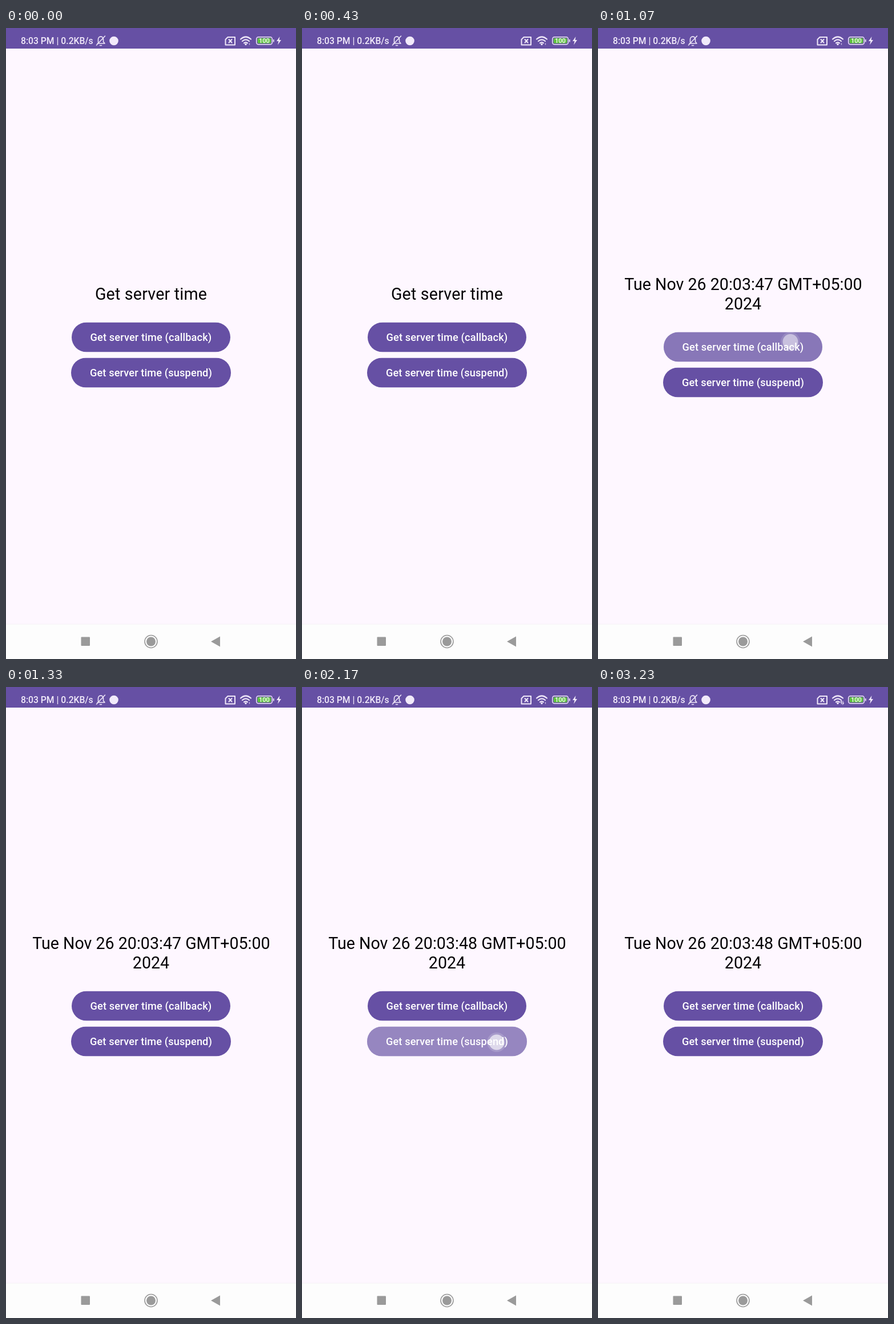
An HTML page for the animation above (3310 ms loop, 508x1103 px).

```html
<!DOCTYPE html>
<html lang="en">
<head>
<meta charset="utf-8">
<title>Get server time</title>
<style>
  html, body { margin: 0; width: 100%; height: 100%; overflow: hidden; background: #fef7ff; }
  svg { display: block; width: 100%; height: 100%; }
  text { font-family: Roboto, sans-serif; }
  .status { font-size: 15.7px; font-weight: 500; fill: #f1eafa; }
  .title { font-size: 28.6px; text-anchor: middle; fill: #050306; }
  .label { font-size: 18.2px; font-weight: 500; letter-spacing: .13px; text-anchor: middle; fill: #fff; }
  .icon { fill: none; stroke: #eee6f8; stroke-width: 2; stroke-linejoin: round; stroke-linecap: round; }
</style>
</head>
<body>
<svg viewBox="0 0 508 1103">
  <defs>
    <clipPath id="clip0"><rect x="115" y="514.5" width="278" height="52" rx="26"/></clipPath>
    <clipPath id="clip1"><rect x="114" y="576.5" width="280" height="52" rx="26"/></clipPath>
  </defs>
  <rect width="508" height="1103" fill="#fef7ff"/>

  <!-- status bar -->
  <rect width="508" height="36" fill="#6650a4"/>
  <text class="status" x="26" y="28">8:03 PM | 0.2KB/s</text>
  <g class="icon" stroke-width="1.6">
    <path d="M160 27H173L170.500 24V20C170.500 13.500 161.500 13.500 161.500 20V25M164.500 30.500H167.500M158.500 30L173.500 14" style="stroke-width:1.600px"/>
    <path d="M388.500 16H401V29.500H384.500V20ZM390.500 20L395.500 25.500M395.500 20L390.500 25.500"/>
    <path d="M411 19.500Q420 11.500 429 19.500M414 23Q420 17.700 426 23M417 26.300Q420 23.800 423 26.300" style="stroke-width:2.200px"/>
  </g>
  <circle cx="189" cy="22.500" r="7.800" fill="#f1eafa"/>
  <circle cx="420" cy="28.500" r="1.700" fill="#f1eafa"/>
  <path d="M426.500 26.500V29.500" stroke="#d5c9ea" stroke-width="1.200"/>
  <path id="traffic" d="M424.700 27L426.500 24.500V30M429 24.500V30L430.800 27.500" fill="none" stroke="#eee6f8" stroke-width="1.200"/>
  <rect x="438.700" y="15.700" width="27.600" height="13" rx="3.500" fill="#6650a4" stroke="#eee6f8" stroke-width="1.500"/>
  <rect x="440.700" y="17.700" width="23.600" height="9" rx="1.800" fill="#5fc33f"/>
  <path d="M468.700 20V24.500" stroke="#eee6f8" stroke-width="1.800"/>
  <text x="452.500" y="26.200" font-size="11" font-weight="500" text-anchor="middle" fill="#fff">100</text>
  <path d="M479.500 15L474 23H477.500L476 29.500L482 21H478.500Z" fill="#f1eafa"/>

  <!-- heading and buttons -->
  <text id="heading" class="title" x="254" y="475" letter-spacing=".2">Get server time</text>
  <g id="date" class="title">
    <text id="stamp" x="254.500" y="458"></text>
    <text x="254" y="492">2024</text>
  </g>
  <g id="buttons">
    <g clip-path="url(#clip0)">
      <rect x="115" y="514.5" width="278" height="52" fill="#6650a4"/>
      <circle class="ripple" fill="#fff"/>
    </g>
    <text class="label" x="254" y="547">Get server time (callback)</text>
    <g clip-path="url(#clip1)">
      <rect x="114" y="576.5" width="280" height="52" fill="#6650a4"/>
      <circle class="ripple" fill="#fff"/>
    </g>
    <text class="label" x="254" y="609">Get server time (suspend)</text>
  </g>
  <g id="touch" fill="#fff">
    <circle r="17" opacity=".16"/>
    <circle r="13.500" opacity=".64"/>
  </g>

  <!-- navigation bar -->
  <rect y="1042" width="508" height="61" fill="#fdfdfd"/>
  <path d="M0 1042H508" stroke="#f5f0f6"/>
  <g fill="#9a9a9a">
    <rect x="131.500" y="1064.500" width="15.500" height="15.500" rx="1"/>
    <circle cx="254" cy="1072.500" r="11" fill="none" stroke="#9a9a9a" stroke-width="1.600"/>
    <circle cx="254" cy="1072.500" r="8"/>
    <path d="M359 1072.500L375 1063.500V1081.500Z"/>
  </g>
</svg>
<script>
const LOOP = 3310;
// start: ripple begins, shown: first visible, y: touch height, cy: button centre, shift: button offset at touch
const taps = [
  { start: 782, shown: 830, x: 337, y: 548.5, cy: 540.5, shift: 0 },
  { start: 1922, shown: 1970, x: 341, y: 621, cy: 602.5, shift: 17 }
];
const $ = id => document.getElementById(id);
const ripples = document.querySelectorAll('.ripple');
const clamp = v => Math.max(0, Math.min(1, v));
const mix = (a, b, p) => a + (b - a) * p;

// cubic-bezier(.4, 0, .2, 1), solved by bisection
function ease(x) {
  let lo = 0, hi = 1;
  for (let i = 0; i < 20; i++) {
    const s = (lo + hi) / 2, r = 1 - s;
    if (1.2 * r * r * s + .6 * r * s * s + s ** 3 < x) lo = s; else hi = s;
  }
  return 3 * (1 - lo) * lo * lo + lo ** 3;
}

function setAttrs(el, attrs) {
  for (const name in attrs) el.setAttribute(name, attrs[name]);
}

function draw(t) {
  const [first, second] = taps.map(tap => t >= tap.start + 228);
  $('heading').style.display = first ? 'none' : '';
  $('date').style.display = first ? '' : 'none';
  $('stamp').textContent = `Tue Nov 26 20:03:${second ? 48 : 47} GMT+05:00`;
  setAttrs($('buttons'), { transform: `translate(0 ${first ? 17 : 0})` });
  $('traffic').style.display = t >= 2300 ? '' : 'none';

  let touchAlpha = 0;
  taps.forEach((tap, i) => {
    const age = t - tap.start, p = clamp(age / 225), visible = t >= tap.shown;
    setAttrs(ripples[i], {
      cx: mix(tap.x, 254, p),
      cy: mix(tap.y - tap.shift, tap.cy, p),
      r: mix(83, 154, ease(p)),
      opacity: visible ? .31 * clamp(age / 75) * clamp(1 - (age - 248) / 150) : 0
    });
    const alpha = visible ? clamp(1 - (age - 248) / 180) : 0;
    if (alpha > 0) {
      touchAlpha = alpha;
      setAttrs($('touch'), { transform: `translate(${tap.x} ${tap.y})` });
    }
  });
  setAttrs($('touch'), { opacity: touchAlpha });
}

const begin = performance.now();
function tick() {
  draw((performance.now() - begin) % LOOP);
  requestAnimationFrame(tick);
}
tick();
</script>
</body>
</html>
```
